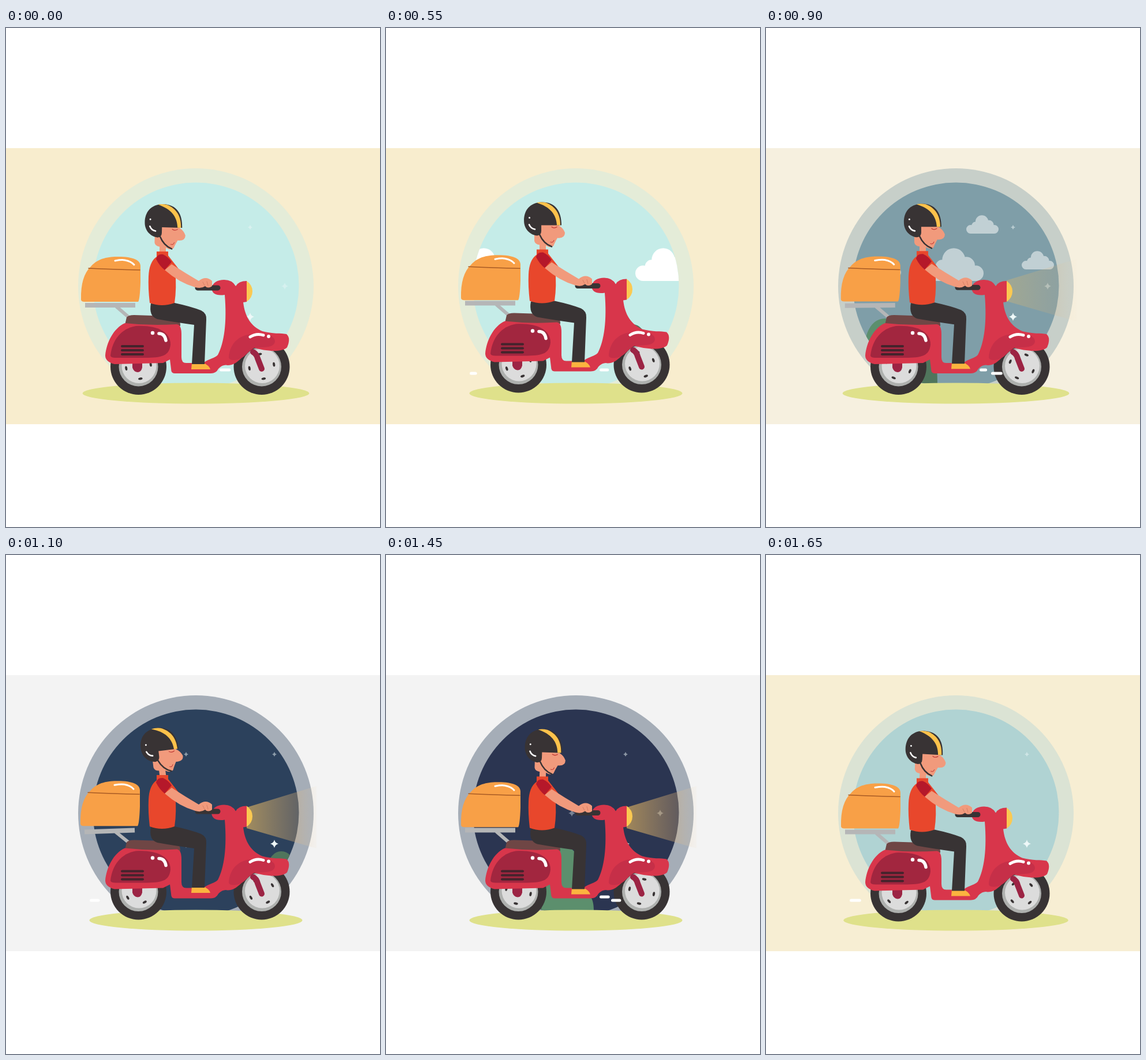
An HTML page with a canvas that plays this animation: 648 px wide and 864 px high, repeating every 1.7 s.

```html
<!DOCTYPE html>
<html lang="en">
<head>
<meta charset="utf-8">
<title>Scooter delivery</title>
<style>
html, body { margin: 0; width: 100%; height: 100%; overflow: hidden; background: #fff; }
canvas { display: block; }
</style>
</head>
<body>
<canvas id="stage" width="648" height="864"></canvas>
<script>
const ctx = document.getElementById('stage').getContext('2d');
const LOOP = 1700, SWAY = LOOP / 2, DASH_CYCLE = LOOP / 6, STEP = 50;
const SCROLL = 1.3, STAR_SPEED = 0.58;
const DARK = '#383334', RED = '#d8364b', WINE = '#9c2444', SKIN = '#f19a7c', YELLOW = '#fdc24b';

// Scenery x positions hold at 750 ms
const BIG_CLOUDS = [-139, 172, 472];
const SMALL_CLOUDS = [[-320, 406], [296, 385], [373, 431], [542, 356], [638, 418]];
const BUSHES = [[-452, 1], [345, 1], [1270, -1]];
const SHRUBS = [167, 932];
// lag, y, radius, opacity
const STAR_ROWS = [[0, 345, 4, .5], [0, 500, 7, 1], [60, 447, 6, .4]];
// x, y, phase
const DASHES = [[370, 592, .04], [390, 598, .2], [145, 598, .8]];

const ramp = (t, start, end) => Math.min(1, Math.max(0, (t - start) / (end - start)));
const wave = (phase, peak) => Math.cos(2 * Math.PI * (phase - peak));

function blend(a, b, k) {
  return a.map((v, i) => Math.round(v + (b[i] - v) * k));
}

function fill(color, d) {
  ctx.fillStyle = color;
  ctx.fill(new Path2D(d));
}

function stroke(color, width, d) {
  ctx.strokeStyle = color;
  ctx.lineWidth = width;
  ctx.lineCap = 'round';
  ctx.stroke(new Path2D(d));
}

function oval(color, x, y, rx, ry = rx) {
  ctx.fillStyle = color;
  ctx.beginPath();
  ctx.ellipse(x, y, rx, ry, 0, 0, 7);
  ctx.fill();
}

function group(draw, { x = 0, y = 0, turn = 0, flip = 1, alpha = 1 } = {}) {
  ctx.save();
  ctx.translate(x, y);
  ctx.rotate(turn);
  ctx.scale(flip, 1);
  ctx.globalAlpha *= Math.max(0, alpha);
  draw();
  ctx.restore();
}

function pivot(px, py, degrees, draw) {
  group(() => group(draw, { x: -px, y: -py }), { x: px, y: py, turn: degrees * Math.PI / 180 });
}

function cloud(x, bottom, width) {
  const s = width / 60;
  ctx.fillStyle = '#fff';
  ctx.beginPath();
  for (const [cx, cy, r] of [[8, -8, 8], [17, -15, 7], [29, -22, 12], [42, -16, 9], [52, -8, 8]]) {
    ctx.moveTo(x + (cx + r) * s, bottom + cy * s);
    ctx.arc(x + cx * s, bottom + cy * s, r * s, 0, 7);
  }
  ctx.rect(x + 8 * s, bottom - 15 * s, 44 * s, 15 * s);
  ctx.fill();
}

function bush() {
  fill('#50755c', 'M75 615V540Q80 508 105 508Q130 508 130 545Q147 560 147 615Z');
  fill('#5c8f6d', 'M0 615C0 590 10 584 24 586C14 540 28 503 56 503C80 503 90 525 90 560V615Z');
}

function star(r) {
  const q = r * .2;
  fill('#eef8f8', `M0 ${-r}Q${q} ${-q} ${r} 0Q${q} ${q} 0 ${r}Q${-q} ${q} ${-r} 0Q${-q} ${-q} 0 ${-r}Z`);
}

function stars(t) {
  const now = t < 300 ? t + LOOP : t;
  const glow = ramp(now, 800, 900) * (1 - ramp(now, LOOP, LOOP + 200));
  for (let column = 0; column < 4; column++) {
    for (const [lag, y, r, alpha] of STAR_ROWS) {
      group(() => star(r), { x: 950 + column * 153 + lag - now * STAR_SPEED, y, alpha: alpha * glow });
    }
  }
}

function scenery(t, night) {
  oval(`rgb(${blend([228, 236, 216], [165, 173, 183], night)})`, 329, 447, 204);
  const darkSky = blend([44, 65, 92], [43, 53, 81], ramp(t, 1100, 1400));
  ctx.beginPath();
  ctx.arc(329, 446, 178.5, 0, 7);
  ctx.fillStyle = `rgb(${blend([197, 236, 232], darkSky, night)})`;
  ctx.fill();
  ctx.clip();

  const shift = (750 - t) * SCROLL;
  stars(t);
  group(() => {
    BIG_CLOUDS.forEach(x => cloud(x + shift, 438, 100));
    SMALL_CLOUDS.forEach(([x, bottom]) => cloud(x + shift, bottom, 56));
  }, { alpha: 1 - night * 1.07 });
  SHRUBS.forEach(x => oval('#50755c', x + shift, 540, 23, 27));
  BUSHES.forEach(([x, flip]) => group(bush, { x: x + shift, flip }));
}

function beam() {
  const glow = ctx.createLinearGradient(417, 0, 538, 0);
  glow.addColorStop(0, 'rgba(240,190,95,.6)');
  glow.addColorStop(.7, 'rgba(225,180,120,.32)');
  glow.addColorStop(1, 'rgba(240,220,190,.1)');
  fill(glow, 'M417 437L538 400V508L417 473Z');
}

function wheel(x, turn) {
  oval(DARK, x, 586.5, 48.5);
  oval('#aeb0ae', x, 586.5, 34);
  oval('#dcdcdc', x + 1, 585, 30);
  for (let i = 0; i < 4; i++) {
    group(() => oval(DARK, 0, 21.5, 3.8, 2), { x, y: 586, turn: turn + i * Math.PI / 2 });
  }
}

function rack() {
  stroke('#b5b6b7', 6, 'M192 483L221 508');
  fill('#b5b6b7', 'M137 476H224V484H137Z');
}

function box() {
  fill('#f8a047', 'M130 470Q129 430 147 413C160 398 178 396 195 396C220 396 233 402 233 412' +
    'V440Q232 470 229 474H136Q130 474 130 470Z');
  stroke('#a75a24', 1.5, 'M143 416Q185 418 232 419');
  stroke('#fff', 3, 'M189 403Q200 401 206 402Q217 404 222 410');
}

function scooter(turn, tilt) {
  wheel(229.5, turn);
  wheel(443, turn);
  fill(WINE, 'M219 578H236V588Q234 596 228 596Q221 595 219 588Z');
  pivot(221, 508, tilt, rack);
  fill('#6f4645', 'M206 514L209 501Q212 497 222 497L285 499Q303 502 302 516Z');
  fill(RED, 'M172 567C174 545 186 520 206 511Q250 516 296 513Q304 514 304 530V570Q304 580 312 580' +
    'H342C352 572 362 572 367 566C378 545 383 510 379 462Q357 465 356 450Q360 436 378 436' +
    'Q392 436 398 447Q403 438 417 438V474L411 475C414 500 424 516 444 525C462 530 476 528 486 530' +
    'Q494 537 487 553C478 562 450 560 428 553C410 566 402 584 384 584Q376 582 368 590' +
    'Q364 598 355 598H292Q286 598 286 590L284 574L272 580L188 582Q172 578 172 567Z');
  fill('#a2263f', 'M181 567C184 540 200 520 225 516C260 514 285 525 285 548C283 568 270 571 240 571H190Q181 571 181 567Z');
  fill('#c62f48', 'M386 570C388 545 405 530 430 530C450 528 466 532 466 543C464 555 445 552 430 554C418 560 412 575 395 575Q386 575 386 570Z');
  stroke(WINE, 10, 'M428 561Q434 564 436 572L443 590');
  for (let y = 551; y < 570; y += 7) stroke('#44232c', 4, `M201 ${y}H237`);
  oval('#fff', 254, 528, 3.2);
  stroke('#fff', 5.5, 'M265 529Q275 529 277 541');
  oval('#fff', 455, 534, 3);
  stroke('#fff', 5, 'M423 535Q434 528 446 532');
  fill('#fbc951', 'M417 438Q427 445 427 456Q427 467 417 474Z');
}

function head() {
  fill(SKIN, 'M257 355V372Q258 378 266 379V388H277V380Q284 385 290 381Q294 372 297 367' +
    'Q310 368 310 358Q307 350 300 346L297 338H262Z');
  fill(DARK, 'M270 305C248 306 239 320 239 337C239 352 250 362 262 363Q269 362 269 355V345H304C304 320 293 305 270 305Z');
  fill(YELLOW, 'M261 306Q268 304 277 306C293 312 302 325 302 345H296C295 326 284 313 261 306Z');
  stroke(DARK, 2.5, 'M266 361Q273 377 287 382');
  stroke('#c23a35', 1.3, 'M287 348Q291 351 296 348');
  stroke('#c23a35', 1, 'M285 374Q289 376 291 371');
  stroke('#fff', 2.6, 'M248 344Q251 351 258 352');
  oval('#fff', 248.5, 332, 1.5);
}

function rider(tilt) {
  fill('#fbb43f', 'M322 580H342Q352 584 354 591H321Z');
  fill(DARK, 'M251 477L292 476Q320 482 338 489Q348 494 347 505L344 582H322L326 514Q290 509 262 504Q247 499 251 477Z');
  pivot(270, 386, tilt, head);
  fill('#e8472c', 'M261 387H281V394L299 417L293 420Q296 450 292 476Q270 484 249 476Q246 450 247 430Q248 405 261 396Z');
  stroke(DARK, 9, 'M332 450H367');
  fill(SKIN, 'M275 419L287 409Q310 424 334 438Q346 428 357 438V447Q350 452 345 447Q338 452 328 449Q300 441 275 419Z');
  stroke('#d67f65', 1, 'M341 440L344 446M348 439L350 446');
  fill('#b5182a', 'M260 400Q262 391 272 392Q281 396 287 405L275 419Q266 412 260 400Z');
}

function dashes(t) {
  for (const [x, y, peak] of DASHES) {
    const size = wave(t / DASH_CYCLE, peak);
    if (size > .55) stroke('#fff', 5, `M${x + 2.5} ${y}h${20 * size - 5}`);
  }
}

function draw(t) {
  const phase = t / SWAY;
  const night = ramp(t, 750, 1080) * (1 - ramp(t, 1460, 1680));
  const bounce = -3.5 * (1 - Math.max(0, wave(phase, .03)));
  const lift = Math.max(0, wave(phase, .27));
  const riderY = bounce - 2.5 * lift;
  const headTilt = 5.5 * wave(phase, .85) - 1.5;

  ctx.fillStyle = '#fff';
  ctx.fillRect(0, 0, 648, 864);
  ctx.fillStyle = `rgb(${blend([248, 237, 206], [243, 243, 243], night)})`;
  ctx.fillRect(0, 208, 648, 478);
  group(() => {
    ctx.beginPath();
    ctx.rect(0, 208, 648, 422);
    ctx.clip();
    scenery(t, night);
  });
  oval('#dfe18b', 329, 632.5, 196.5 + bounce * 3.4, 18);
  group(beam, { alpha: ramp(t, 800, 1000) * (1 - ramp(t, 1480, 1600)) });
  group(() => scooter((t / LOOP * 12 - .1) * Math.PI / 2, -2 * lift), { y: bounce });
  group(box, { x: -lift, y: riderY * .8 });
  group(() => rider(headTilt), { y: riderY });
  dashes(t);
}

function tick() {
  draw(Math.floor(performance.now() % LOOP / STEP) * STEP);
  requestAnimationFrame(tick);
}
tick();
</script>
</body>
</html>
```
